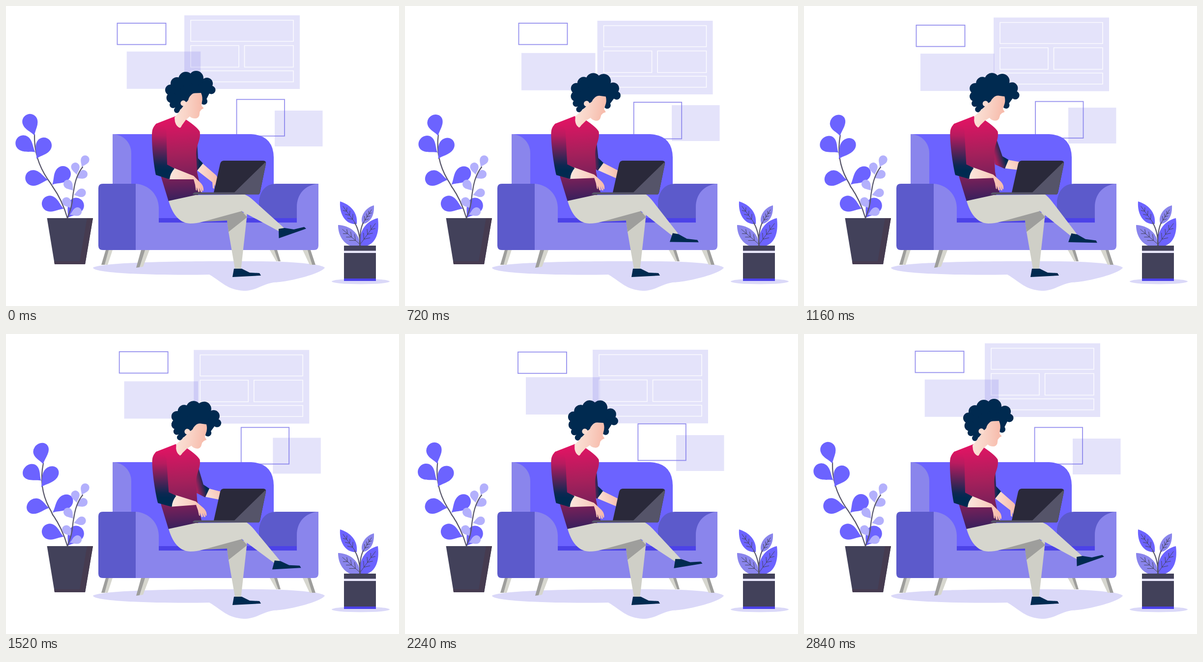
An HTML page for the animation above (2880 ms loop, 800 by 611 pixels).

```html
<!DOCTYPE html>
<html lang="en">
<head>
<meta charset="utf-8">
<title>Working on the sofa</title>
<style>
  html, body { margin: 0; width: 100%; height: 100%; overflow: hidden; background: #fff; }
  svg { display: block; width: 100vw; height: 100vh; }
  .blue { fill: #6c63ff; }
  .light { fill: #8a85ec; }
  .dark { fill: #5c5acb; }
  .deep { fill: #4c42e8; }
  .pale { fill: #b3b0fc; }
  .shade { fill: #dad8f8; }
  .cloth { fill: #d6d6ce; }
  .grey { fill: #9e9e9c; }
  .navy { fill: #002a50; }
  .slate { fill: #42415a; }
  .glass { fill: rgb(110 105 225 / .19); }
  .frame { fill: none; stroke: #9590ee; stroke-width: 1.8; }
  .cells { fill: none; stroke: #fff; stroke-opacity: .85; stroke-width: 1.6; }
  .stem { fill: none; stroke: #58566a; stroke-width: 2.2; stroke-linecap: round; }
  .vein { fill: none; stroke: #45435f; stroke-width: 1; stroke-linecap: round; }
</style>
</head>
<body>
<svg viewBox="0 0 800 611" preserveAspectRatio="none">
  <defs>
    <linearGradient id="shirt" gradientUnits="userSpaceOnUse" x1="352" y1="230" x2="364" y2="396">
      <stop offset="0" stop-color="#df1463"/><stop offset=".42" stop-color="#a5205b"/>
      <stop offset=".7" stop-color="#7c2059"/><stop offset="1" stop-color="#36205c"/>
    </linearGradient>
    <linearGradient id="sleeve" gradientUnits="userSpaceOnUse" x1="314" y1="240" x2="309" y2="334">
      <stop offset="0" stop-color="#dc1462"/><stop offset=".25" stop-color="#b81b5f"/>
      <stop offset=".9" stop-color="#0c2852"/><stop offset="1" stop-color="#002a50"/>
    </linearGradient>
    <linearGradient id="farSleeve" gradientUnits="userSpaceOnUse" x1="376" y1="0" x2="395" y2="0">
      <stop offset="0" stop-color="#a5205b"/><stop offset="1" stop-color="#002a50"/>
    </linearGradient>
    <linearGradient id="skin" gradientUnits="userSpaceOnUse" x1="338" y1="0" x2="398" y2="0">
      <stop offset="0" stop-color="#fbe4da"/><stop offset=".5" stop-color="#f9d3c6"/><stop offset="1" stop-color="#f7bcac"/>
    </linearGradient>
    <linearGradient id="farSkin" gradientUnits="userSpaceOnUse" x1="390" y1="0" x2="430" y2="0">
      <stop offset="0" stop-color="#fbe0d5"/><stop offset="1" stop-color="#f7bcac"/>
    </linearGradient>
    <path id="drop" d="M0 0C-3-9-16-18-16-31A16 16 0 0 1 16-31C16-18 3-9 0 0Z"/>
  </defs>

  <!-- wall panels -->
  <rect id="frameA" class="frame" width="99" height="43.5"/>
  <g id="board">
    <rect class="glass" width="235" height="150"/>
    <path class="cells" d="M13 10h209v43H13zM13 61.5h98v44H13zM122.5 61.5H222v44h-99.500zM13 113h209v22.500H13z"/>
  </g>
  <rect id="glassA" class="glass" width="150.500" height="76"/>
  <rect id="frameB" class="frame" width="97.500" height="74.500"/>
  <rect id="glassB" class="glass" width="97.500" height="73"/>

  <!-- sofa -->
  <path class="shade" d="M177 533C200 520 400 519 520 520C600 521 645 527 649 533C640 546 575 562 545 563C522 566 510 580 484 580C450 578 440 562 414 547C330 549 180 546 177 533Z"/>
  <path class="grey" d="M203 497h7l-9 30h-7zM275 497h9l-12 35-7 1zM545 497h7l7 23h-5zM613 497h7l10 30h-7z"/>
  <path class="cloth" d="M209 497h8l-10 30h-6zM283 497h9l-13 34-7 1zM537 497h9l8 23h-4zM604 497h10l9 30h-5z"/>
  <path class="blue" d="M217 261H499Q544 263 545 308V440H217Z"/>
  <path class="light" d="M217 261C240 262 255 279 255 300V380H217Z"/>
  <path class="dark" d="M515 397C518 374 531 362 550 362H636V440H515Z"/>
  <path class="light" d="M264 362C291 364 310 384 311 410V441H592V410C592 384 608 364 636 362V488Q636 497 627 497H264Z"/>
  <path class="blue" d="M311 405H515V432H311Z"/>
  <path class="dark" d="M515 395H592V432H515Z"/>
  <path class="deep" d="M311 432H592V441H311Z"/>
  <path class="dark" d="M197 362H264V497H197Q188 497 188 488V371Q188 362 197 362Z"/>

  <!-- tall plant -->
  <path class="stem" d="M95 368C110 389 119 411 125 432"/>
  <g id="lowLeaves"></g>
  <g id="sway">
    <path class="stem" d="M58 262C57 295 66 325 85 353Q91 361 95 368"/>
    <g id="highLeaves"></g>
  </g>
  <g id="sprigLeaves"></g>
  <path class="stem" d="M125 432C138 400 134 392 138 375C141 352 148 338 156 328"/>
  <path class="slate" d="M83.500 432H177L161 526H99Z"/>
  <path fill="#463b50" d="M165 432H177L161 526H99L98 520H150Z"/>

  <!-- small plant -->
  <ellipse class="shade" cx="722" cy="561" rx="59" ry="5.500"/>
  <path class="light" d="M749 406C750 424 744 441 726 444C719 430 732 410 749 406ZM676 446C700 447 720 462 721 488H700C686 482 676 466 676 446Z"/>
  <path class="blue" d="M680 398C700 404 717 420 714 444C694 446 678 428 680 398ZM757 432C732 438 717 460 721 488H736C756 480 760 456 757 432Z"/>
  <path class="stem" d="M710 442Q720 458 721 488M727 442Q720 455 720 488"/>
  <path class="vein" id="veins"/>
  <path class="slate" d="M688 488H753V560H688Z"/>
  <path fill="#e9e7fb" d="M688 498.500H753V503H688Z"/>
  <path class="deep" d="M688 555H753V560H688Z"/>

  <!-- person -->
  <g id="farArm">
    <g id="farFore">
      <path fill="url(#farSkin)" d="M388 334L400 320.500L428 345Q432 352 433 358L436 373L433 373L429 364L431 373L428 373L424 363L424 372L421 371L420 359Z"/>
    </g>
    <path fill="url(#farSleeve)" d="M378 256L389 274L391 310L401 320.500L388.500 336L372 322Z"/>
  </g>
  <path fill="url(#shirt)" d="M305 240L346 224L354 248L366 231Q390 247 394.500 256C397 273 387 282 387 302L389 338L398 380L386 388L331 398L316 349L300 262Z"/>
  <path fill="#cfcfc7" d="M450 434L491 418L490 432L478.500 535H466L453 460Z"/>
  <path class="grey" d="M385 440L479 417L491 430L453 460L450 437Z"/>
  <path class="navy" d="M464 535H480L496 543L516 544L519 549L461 552Z"/>
  <g id="shin">
    <path class="cloth" d="M479 384H486Q495 388 505 397L566 452L556 459L480 418Z"/>
    <g id="foot">
      <path class="navy" d="M555 454L567 452L586 455L607 450L611 453.500L555.500 473Z"/>
    </g>
  </g>
  <path class="cloth" d="M331 397L386 385L485 384Q494 387 500 393L479 418L402 439Q388 443 375 443C350 442 338 420 331 397Z"/>
  <path fill="#2a293a" d="M443 315H523Q530 315 529 321L517 380Q516 384 512 384H422L436 321Q438 315 443 315Z"/>
  <path fill="#555469" d="M528 318L529 322L517 380Q516 384 512 384H380Q381 379.500 386 379.500H465Z"/>
  <g id="nearArm">
    <g id="nearFore">
      <path fill="url(#skin)" d="M331 353Q333 340 342 330L382 346L397 361Q403 368 402 376L400 377L397 370L399.500 379H396.500L393 370L394.500 378L391.500 379L388.500 369L388.500 376L386.500 375L385 364L382 353Z"/>
    </g>
    <path fill="url(#sleeve)" d="M305 240.500C298 248 297 254 297 265C297 290 301 325 305 344L333 353Q334 341 343 331L328 323L326.500 254L318 236Z"/>
  </g>
  <g id="head">
    <g class="navy" id="curls">
      <path d="M340 165L366 145L405 150L417 172L404 198L370 198L349 216L338 195Z"/>
    </g>
    <path fill="url(#skin)" d="M343 227L351 217L360 205L366 196Q371 194 372 188Q377 178 384 177.500L397 177Q401 186 399 195L398 203L402.500 208L397 211.500Q396 214 394.500 215L393.500 223Q391 229 385 229Q378 229 374 225L366 232L358 243Q356 248 354 248Q347 246 344 236Z"/>
    <circle cx="361" cy="198" r="5.700" fill="#fbdcd1"/>
  </g>
</svg>

<script>
const LOOP = 2880, STEP = 40, END = 2840;
const $ = id => document.getElementById(id);
const svgNS = 'http://www.w3.org/2000/svg';

function add(parent, tag, attrs) {
  const el = document.createElementNS(svgNS, tag);
  for (const key in attrs) el.setAttribute(key, attrs[key]);
  $(parent).append(el);
}

// Teardrop leaf: tip position, angle, size
function leaf(parent, cls, x, y, angle, size = 1) {
  add(parent, 'use', {
    href: '#drop', class: cls,
    transform: `translate(${x} ${y}) rotate(${angle}) scale(${size})`
  });
}
leaf('highLeaves', 'blue', 58, 264, -18, .97);
leaf('highLeaves', 'blue', 60, 298, -53);
leaf('highLeaves', 'blue', 62, 311, 29);
leaf('highLeaves', 'blue', 86, 354, -83);
leaf('highLeaves', 'blue', 94, 364, 45);
leaf('lowLeaves', 'blue', 118, 413, -70);
leaf('lowLeaves', 'blue', 125, 432, 35);
leaf('sprigLeaves', 'pale', 154, 328, 25, .54);
leaf('sprigLeaves', 'pale', 144, 344, -10, .54);
leaf('sprigLeaves', 'pale', 143, 351, 60, .54);
leaf('sprigLeaves', 'pale', 137, 376, -40, .56);
leaf('sprigLeaves', 'pale', 138, 385, 74, .54);
leaf('sprigLeaves', 'pale', 133, 412, -36, .55);
leaf('sprigLeaves', 'pale', 130, 425, 68, .54);

[[403, 194, 7], [418, 171, 8.5], [409, 158, 12], [387, 147, 15], [366, 149, 15], [348, 158, 13],
 [335, 171, 11], [337, 187, 10.5], [340, 201, 7], [348, 212, 6]]
  .forEach(([cx, cy, r]) => add('curls', 'circle', { cx, cy, r }));

// Midrib from base to tip with paired side veins
function rib(x, y, tipX, tipY, len) {
  const dx = tipX - x, dy = tipY - y, dir = Math.atan2(dy, dx);
  let d = `M${x} ${y}L${tipX} ${tipY}`;
  for (const u of [.22, .46, .7]) for (const side of [-.7, .7]) {
    const r = len * (1.1 - u * .6);
    d += `M${x + dx * u} ${y + dy * u}l${r * Math.cos(dir + side)} ${r * Math.sin(dir + side)}`;
  }
  return d;
}
$('veins').setAttribute('d', rib(711, 442, 686, 408, 11) + rib(727, 442, 744, 415, 8) +
  rib(719, 484, 685, 455, 13) + rib(722, 484, 752, 443, 13));

// Monotone cubic through timed values
function curve(times, values) {
  const slope = values.slice(1).map((v, i) => (v - values[i]) / (times[i + 1] - times[i]));
  const tangent = values.map((_, i) => {
    const a = slope[i - 1] ?? slope[i], b = slope[i] ?? slope[i - 1];
    return a * b > 0 ? 2 * a * b / (a + b) : 0;
  });
  return t => {
    let i = 0;
    while (i < times.length - 2 && t > times[i + 1]) i++;
    const h = times[i + 1] - times[i], u = Math.min(1, (t - times[i]) / h), w = 1 - u;
    return values[i] * (1 + 2 * u) * w * w + values[i + 1] * u * u * (3 - 2 * u)
      + h * u * w * (tangent[i] * w - tangent[i + 1] * u);
  };
}

const beats = [0, 400, 720, 1160, 1840, 2240, END];
const boardBeats = [0, 400, 720, 1160, 1840, 2240, 2800, END];
const footBeats = [0, 400, 720, 940, 1160, 1840, 2240, END];
const cycle = (...v) => curve(beats, [...v, v[0]]);

const floats = {
  board: [curve(boardBeats, [363, 383, 391.5, 386, 380.5, 382, 377, 368]),
          curve(boardBeats, [19, 31, 30, 23.5, 40, 32, 20.5, 19])],
  frameA: [cycle(226.5, 236.5, 231.5, 228.5, 232.5, 230), cycle(35, 35, 35, 39, 33.7, 36.7)],
  glassA: [cycle(245.7, 238.8, 237, 237, 244.5, 246), cycle(92.7, 92, 95.7, 97, 95, 88)],
  frameB: [cycle(469.5, 467.5, 465.7, 471, 483, 474.3), cycle(190.3, 197, 196, 194.5, 186, 183)],
  glassB: [cycle(547, 547.5, 543, 538, 549.3, 552), cycle(213, 204.5, 202, 207, 213.5, 206)]
};

// Joints: angle over time and pivot
const joints = {
  head: [cycle(0, 10, 10, 9.6, 8.8, 5.8), 360, 248],
  nearArm: [cycle(0, -.6, -1.8, -1.8, -3.2, -1.5), 312, 250],
  nearFore: [cycle(0, -.3, -.5, -.5, -2.7, -.3), 322, 338],
  farArm: [cycle(0, 3, -3, -16, -9, -2), 383, 262],
  farFore: [cycle(0, 11, -11, -15, -12, -13), 394, 328],
  shin: [curve(footBeats, [0, 5.4, 10, 12.5, 10.6, 6.6, 4.9, 0]), 496, 399],
  foot: [curve(footBeats, [0, 5.6, 10, 13.5, 10, 6.4, 5.1, 0]), 561, 455]
};

function draw(t) {
  for (const id in floats) {
    const [x, y] = floats[id];
    $(id).setAttribute('transform', `translate(${x(t)} ${y(t)})`);
  }
  for (const id in joints) {
    const [angle, x, y] = joints[id];
    $(id).setAttribute('transform', `rotate(${angle(t)} ${x} ${y})`);
  }
  // The upper stem leans right, then back, at a steady speed
  const lean = Math.max(0, 1 - Math.abs(t * 2 / END - 1));
  const skew = lean * .182, squash = lean * .014;
  $('sway').setAttribute('transform', `matrix(1 0 ${-skew} ${1 - squash} ${skew * 368} ${squash * 368})`);
}

const start = performance.now();
function tick() {
  const t = (performance.now() - start) % LOOP;
  draw(Math.floor(t / STEP) * STEP);
  requestAnimationFrame(tick);
}
tick();
</script>
</body>
</html>
```
